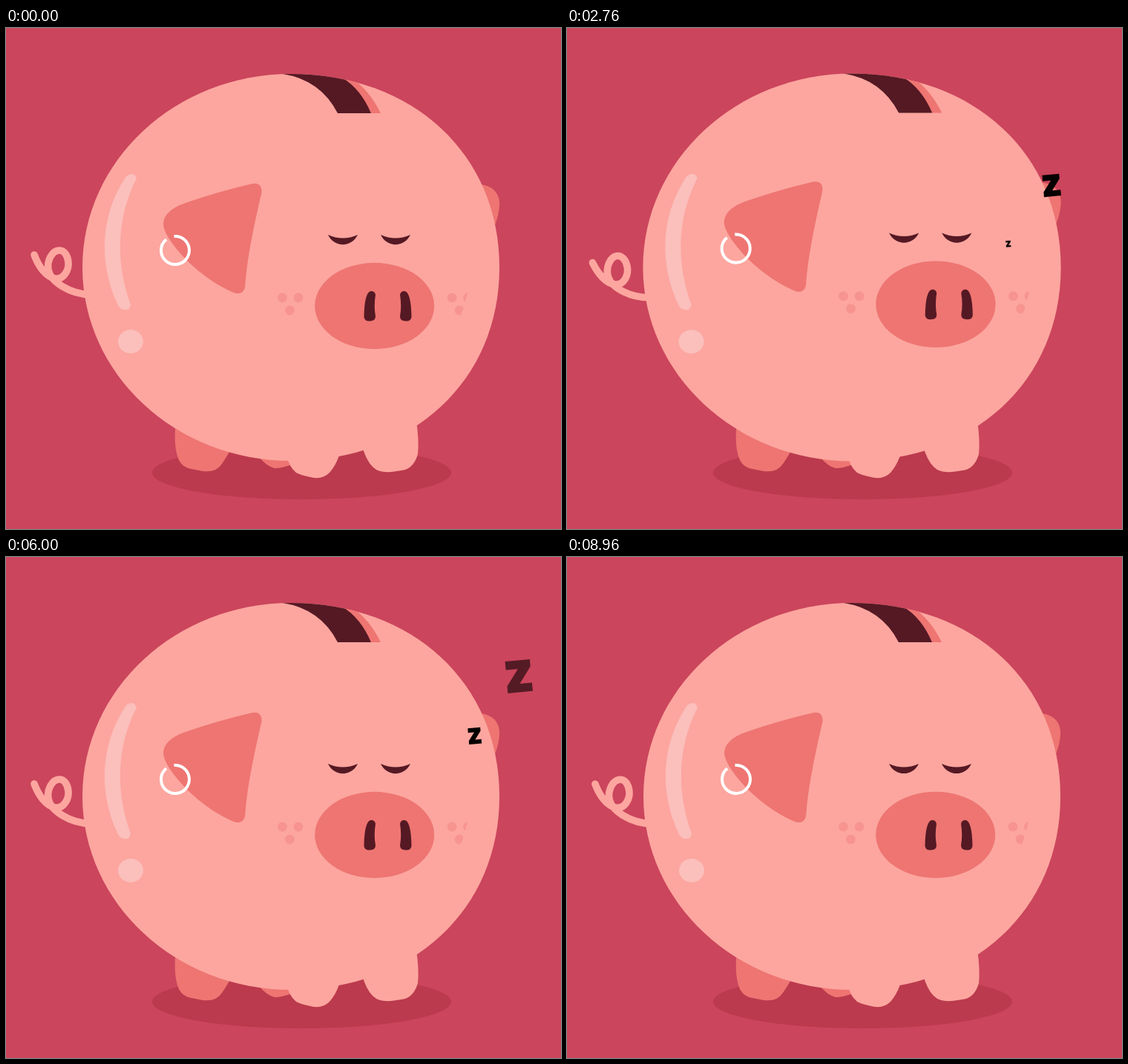
These frames come from a looping animation (748x676 px, 9000 ms). An HTML page with a canvas:

```html
<!DOCTYPE html>
<html lang="en">
<head>
<meta charset="utf-8">
<title>Sleeping piggy bank</title>
<style>
html, body { margin: 0; width: 100%; height: 100%; overflow: hidden; background: #cb455c; }
canvas { display: block; }
</style>
</head>
<body>
<canvas id="stage" width="748" height="676"></canvas>
<script>
const ctx = document.getElementById('stage').getContext('2d');
const LOOP = 9000, BREATH = 3000, STEP = 40;
const SKIN = '#fca69f', ROSE = '#ee7572', DARK = '#551924';

const body = new Path2D('M384 62C548.4 62 665 170.3 665 323C665 475.7 548.4 584 384 584C228.8 584 103 467.1 103 323C103 178.9 228.8 62 384 62Z');
const slot = new Path2D('M373 55V62Q424 70 447 115H492Q478 82 453 67V55Z');
const slotSide = new Path2D('M447 55V67L492 115H505Q490 84 465 67V55Z');
const ear = new Path2D('M330 210.5Q345 207 344.5 222Q325 305 322.5 345Q322 361 308 357.5Q275 344 243 313Q212 280 212 264Q213 246 242 236Q285 221 330 210.5Z');
const farEar = new Path2D('M615 212L636 210.5C655 212 666 222 665 240C664 252 661 262 655 275H615Z');
const tail = new Path2D('M38 306C44 322 54 336 66 338C78 340 85 326 84 316C83 306 78 300 72 300C62 300 55 314 57 326C60 342 85 359 115 360');
const shine = new Path2D('M162 200Q172 193 176 203C148 258 148 318 168 373Q167 382 158 380Q152 378 150 372C126 320 125 255 162 200Z');
const eye = new Path2D('M0 0Q20 9 40 0C32 17.5 8 17.5 0 0Z');
const nostril = new Path2D('M498 360Q497 355 492 355Q483 356 482.5 390Q483 395.5 490 395.5Q498 395.5 498 389Q495.5 375 498 360Z');
const farFeet = new Path2D('M229 530Q225 565 233 583Q238 593 250 595L265 598Q284 600 291 588Q298 578 302 570V530ZM340 578Q352 592 362 594Q372 594 385 589V570Z');
const nearFeet = new Path2D('M378 575Q381 592 391 600Q397 603 408 605.5Q425 611 436 600Q444 591 449 577V560H378ZM482 571Q489 590 499 596Q510 601 523 598.5L536 596.5Q550 593 555 575Q557 558 553 530H482Z');
const cheekEdge = new Path2D('M580 300H636L624.5 348L620.5 364L615.5 381L600 420H580Z');
const zed = new Path2D('M-17.5 -18.5L13.5 -21.5L14.3 -12.5L1 9.2L16.3 8L17.3 18.5L-14 21.5L-14.8 12.5L-1.5 -9L-16.6 -7.8Z');

const ease = u => (1 - Math.cos(Math.PI * Math.min(1, Math.max(0, u)))) / 2;

// Slow rise, quicker fall
function breath(t) {
  const p = t % BREATH;
  return ease(p / 2000) - ease((p - 2040) / 960);
}

function fill(path, color) {
  ctx.fillStyle = color;
  ctx.fill(path);
}

function oval(x, y, rx, ry, color) {
  ctx.fillStyle = color;
  ctx.beginPath();
  ctx.ellipse(x, y, rx, ry, 0, 0, Math.PI * 2);
  ctx.fill();
}

function group(draw) {
  ctx.save();
  draw();
  ctx.restore();
}

function freckles(x, y) {
  for (const [dx, dy] of [[0, 0], [21.5, 0], [10, 17]]) {
    oval(x + dx, y + dy, 6.4, 6.4, '#f79490');
  }
}

function drawTail(b) {
  ctx.translate(155, 343);
  ctx.rotate(-35 * b * Math.PI / 180);
  ctx.translate(-155, -343);
  ctx.strokeStyle = SKIN;
  ctx.lineWidth = 9.6;
  ctx.lineCap = 'round';
  ctx.stroke(tail);
}

function drawFace(lift) {
  group(() => {
    ctx.clip(cheekEdge);
    freckles(601, 364 - lift);
  });
  ctx.translate(0, -lift);
  freckles(372.5, 364);
  fill(ear, ROSE);
  ctx.strokeStyle = '#fff';
  ctx.lineWidth = 4;
  ctx.lineCap = 'butt';
  ctx.beginPath();
  ctx.arc(228, 300, 19, -1.65, 4.03);
  ctx.stroke();
  for (const x of [434, 505]) {
    group(() => {
      ctx.translate(x, 279);
      fill(eye, DARK);
    });
  }
  oval(496.7, 375, 80.5, 58.2, ROSE);
  fill(nostril, DARK);
  ctx.translate(1029, 0);
  ctx.scale(-1, 1);
  fill(nostril, DARK);
}

function drawPig(t) {
  const b = breath(t), lift = 16.2 * b;
  const swell = t < BREATH ? 1 + 0.0142 * b : 1;
  oval(398.5, 600, 201.5, 36, '#bb3a4d');
  fill(farFeet, ROSE);
  group(() => {
    ctx.translate(384, 323);
    ctx.scale(swell, swell);
    ctx.translate(-384, -323);
    group(() => drawTail(b));
    group(() => {
      ctx.translate(0, -lift);
      fill(farEar, ROSE);
    });
    fill(body, SKIN);
    group(() => {
      ctx.clip(body);
      fill(slotSide, ROSE);
      fill(slot, DARK);
    });
    fill(shine, '#fbbfbc');
    oval(168, 423, 17, 16, '#fbbfbc');
    group(() => drawFace(lift));
  });
  fill(nearFeet, SKIN);
}

function drawZ(age) {
  if (age <= 0 || age >= 4520) return;
  ctx.globalAlpha = Math.min(1, (4520 - age) / 800);
  ctx.translate(571 + 0.0298 * age, 323.4 - 0.0402 * age);
  ctx.scale(age / 3760, age / 3760);
  fill(zed, '#050001');
}

function render(t) {
  ctx.fillStyle = '#cb455c';
  ctx.fillRect(0, 0, 748, 676);
  drawPig(t);
  for (const birth of [0, 1960, 3960]) group(() => drawZ(t - birth));
}

const start = performance.now();
function tick() {
  const t = (performance.now() - start) % LOOP;
  render(Math.floor(t / STEP) * STEP);
  requestAnimationFrame(tick);
}
tick();
</script>
</body>
</html>
```
